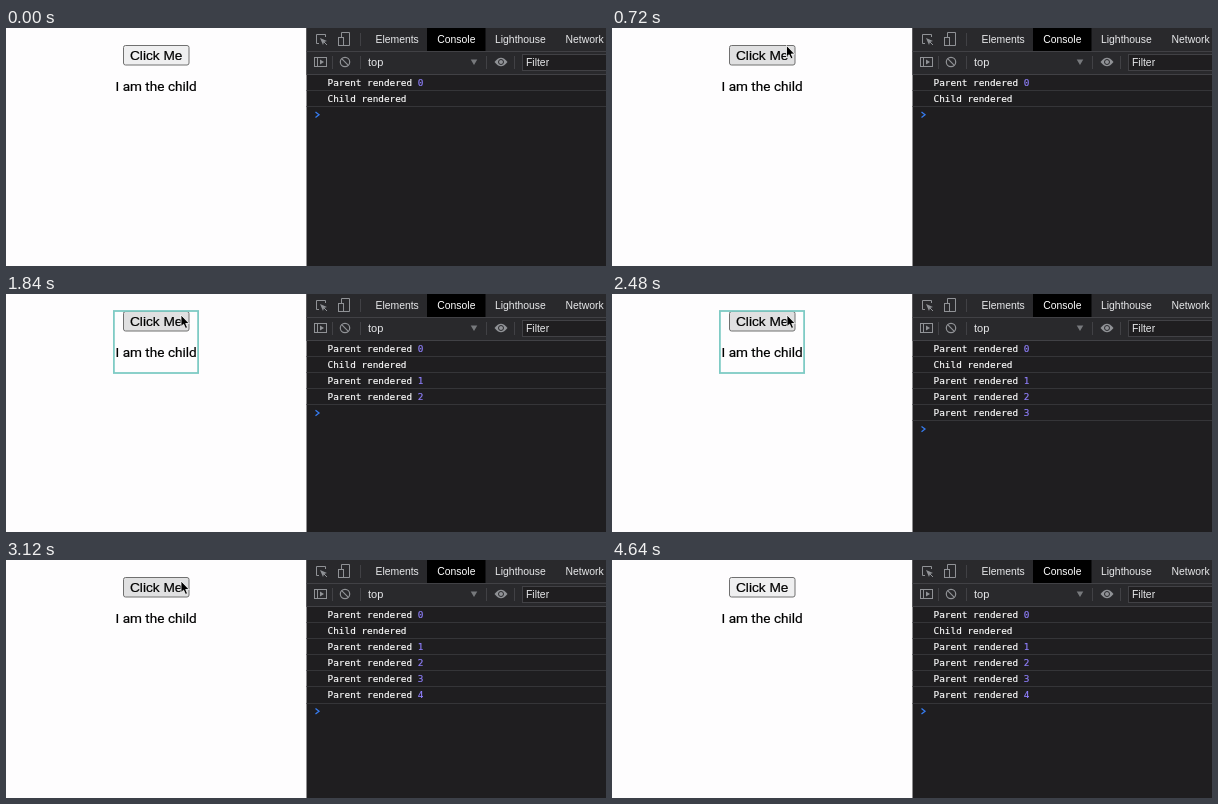
An HTML page that plays this animation: 600 px wide and 238 px high, repeating every 4.72 s.

```html
<!DOCTYPE html>
<html lang="en">
<head>
<meta charset="utf-8">
<style>
  html, body { margin: 0; width: 100%; height: 100%; overflow: hidden; background: #fefdfe; }
  svg { display: block; width: 600px; height: 238px; }
  text { white-space: pre; }
  .page { text-anchor: middle; stroke: #000; stroke-width: .2; }
  .ui { font: 10.4px "Liberation Sans", Arial, sans-serif; fill: #e8e9eb; }
  .log { font: 9.37px "DejaVu Sans Mono", monospace; fill: #fff; stroke: #fff; stroke-width: .15; }
  .count { fill: #9180ff; stroke: #9180ff; }
  .icon { fill: none; stroke: #909296; stroke-width: 1; }
  .line { stroke: #414145; stroke-width: 1; }
  .rule { stroke: #353538; stroke-width: 1; }
</style>
</head>
<body>
<svg viewBox="0 0 600 238">
  <rect width="600" height="238" fill="#fefdfe"/>
  <rect id="button" x="117.5" y="17.5" width="65.5" height="19.5" rx="2" stroke="#707070"/>
  <text class="page" x="150.2" y="31.7" font-family="Liberation Sans, Arial, sans-serif" font-size="13.7">Click Me</text>
  <text class="page" x="150.2" y="63" font-family="Roboto, sans-serif" font-size="13.6">I am the child</text>
  <rect id="highlight" x="107.9" y="17" width="84.2" height="62" fill="none" stroke="#7fcbc5" stroke-width="1.8"/>

  <rect x="300.5" width="299.5" height="238" fill="#1f1e20"/>
  <rect x="300.5" width="299.5" height="46.5" fill="#29292c"/>
  <rect x="421" width="58.5" height="23" fill="#000"/>
  <path class="line" d="M300.5 23.5H600M300.5 46.5H600M354.5 5V18M326.5 28V41M354.5 28V41M480.5 28V41M508.5 28V41"/>
  <g class="ui">
    <text x="369.5" y="14.8">Elements</text>
    <text x="431.3" y="14.8" fill="#fff">Console</text>
    <text x="489" y="14.8">Lighthouse</text>
    <text x="559.5" y="14.8">Network</text>
    <text x="362" y="37.6" font-size="11">top</text>
    <rect x="516.5" y="26.5" width="90" height="16" fill="#1f1e20" stroke="#414145"/>
    <text x="520" y="38.2">Filter</text>
  </g>

  <g class="icon">
    <path d="M313 15.5H310.5V6.5H319.5V9"/>
    <path d="M314 10L321 13L318 14L317 17Z" fill="#909296" stroke="none"/>
    <path d="M317 13L321 17"/>
    <path d="M335.5 9V4.5H343.5V17.5H338"/>
    <rect x="332.5" y="9.5" width="5" height="8"/>
    <rect x="308.5" y="29.5" width="12" height="9"/>
    <path d="M311.5 29.5V38.5"/>
    <path d="M314 31.5L318 34L314 36.5Z" fill="#909296" stroke="none"/>
    <circle cx="339" cy="34" r="4.7" stroke-width="1.2"/>
    <path d="M335.7 30.7L342.3 37.3" stroke-width="1.2"/>
    <path d="M464.7 31.5H471.3L468 37Z" fill="#77797c" stroke="none"/>
    <path d="M488.5 34Q495 25.5 501.5 34Q495 42.5 488.5 34Z" fill="#909296" stroke="none"/>
    <circle cx="495" cy="34" r="2.5" fill="#909296" stroke="#29292c"/>
  </g>
  <g id="rows"></g>
  <path id="prompt" d="M309.5 -2.7L313 0L309.5 2.7" fill="none" stroke="#367cf0" stroke-width="1.3"/>
  <path id="cursor" d="M0 0V11.5L2.6 9.2L4.5 13.4L6.5 12.5L4.7 8.5H8.2Z" fill="#000" stroke="#fff" stroke-width=".8"/>
</svg>
<script>
const LOOP = 4720, STEP = 40, ROW = 16.1;
const CLICKS = [1110, 1640, 2180, 2720];
const HIGHLIGHT_DELAY = 90, HIGHLIGHT_TIME = 250;
// Pointer path: time, x, y
const PATH = [
  [400, 218, 240], [440, 213, 178], [480, 205, 118], [520, 197, 60], [560, 181, 6],
  [600, 177, 4], [680, 174.5, 17], [760, 174.5, 18], [1000, 175, 21],
  [3240, 175, 21], [3320, 207, 63], [3400, 274, 155], [3440, 300, 197],
  [3480, 322, 234], [3520, 340, 270]
];
const $ = id => document.getElementById(id);
const show = (el, on) => el.setAttribute("visibility", on ? "visible" : "hidden");

const labels = ["Parent rendered 0", "Child rendered", ...CLICKS.map((_, i) => `Parent rendered ${i + 1}`)];
$("rows").innerHTML = labels.map((label, i) => {
  const y = 54.5 + i * ROW;
  const text = label.replace(/\d/, '<tspan class="count">$&</tspan>');
  return `<g><text class="log" x="321.6" y="${y + 3.4}">${text}</text>
    <path class="rule" d="M300.5 ${Math.round(y + 7.5) + .5}H600"/></g>`;
}).join("");
const rows = [...$("rows").children];

function pointerAt(t) {
  const i = PATH.findIndex(p => p[0] > t);
  if (i < 1) return null;
  const [t0, x0, y0] = PATH[i - 1], [t1, x1, y1] = PATH[i];
  const k = (t - t0) / (t1 - t0);
  return [x0 + (x1 - x0) * k, y0 + (y1 - y0) * k];
}

function draw(now) {
  const t = Math.floor(now % LOOP / STEP) * STEP;
  const count = 2 + CLICKS.filter(c => c <= t).length;
  rows.forEach((row, i) => show(row, i < count));
  $("prompt").setAttribute("transform", `translate(0 ${54.6 + count * ROW})`);

  show($("highlight"), CLICKS.some(c => {
    const age = t - c - HIGHLIGHT_DELAY;
    return age >= 0 && age < HIGHLIGHT_TIME;
  }));

  const pointer = pointerAt(t);
  show($("cursor"), pointer);
  if (pointer) $("cursor").setAttribute("transform", `translate(${pointer})`);
  const hover = pointer && pointer[0] > 117 && pointer[0] < 183 && pointer[1] > 16 && pointer[1] < 37;
  $("button").setAttribute("fill", hover ? "#e0e0e1" : "#efeff0");
  requestAnimationFrame(() => draw(performance.now()));
}
draw(performance.now());
</script>
</body>
</html>
```
